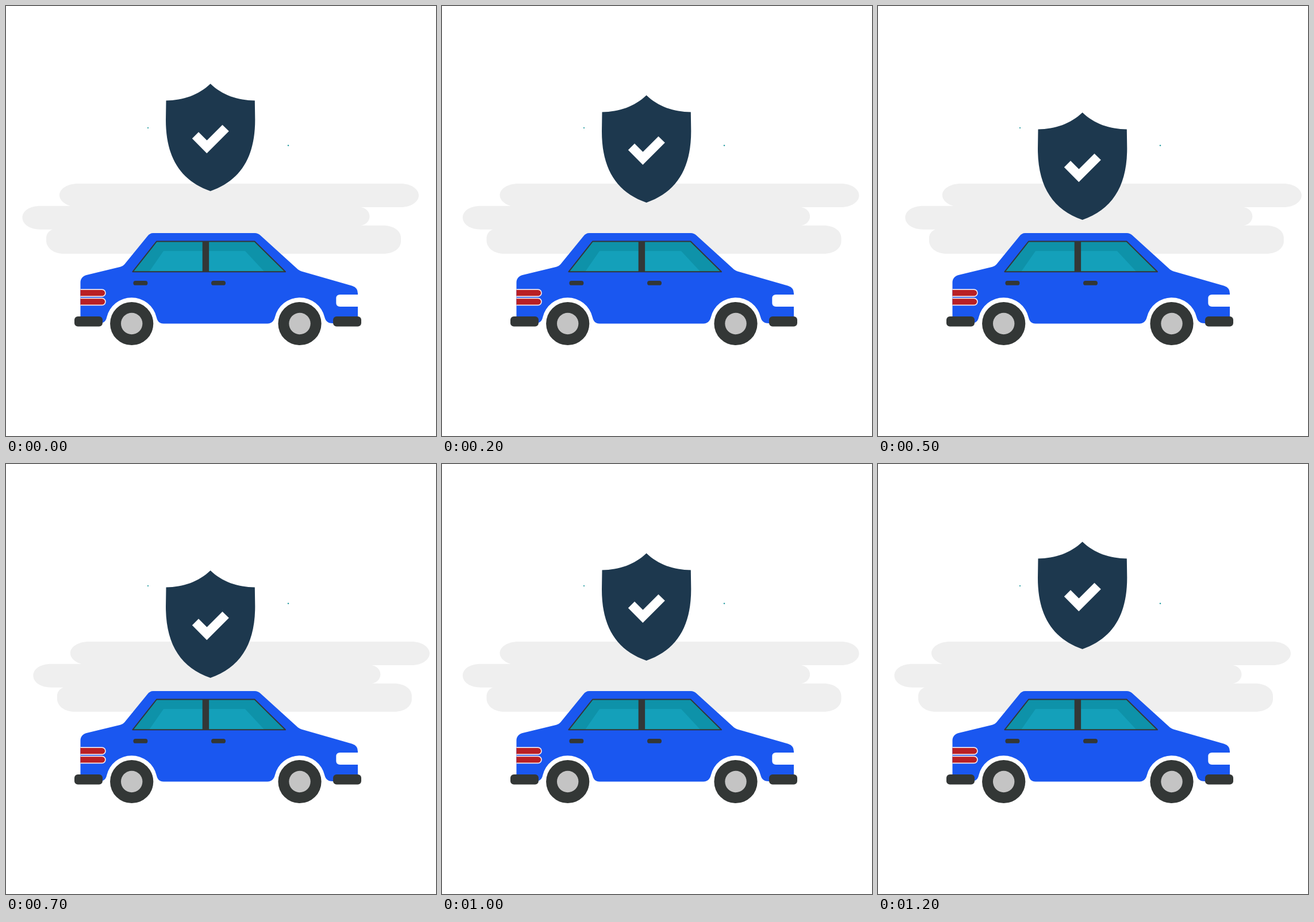
These frames come from a looping animation (748 px wide and 748 px high, 1300 ms). An HTML page:

```html
<!DOCTYPE html>
<html lang="en">
<head>
<meta charset="utf-8">
<title>Car protection</title>
<style>
  html, body { margin: 0; width: 100%; height: 100%; overflow: hidden; background: #fff; }
  svg { display: block; width: 100%; height: 100%; }
  .dark { fill: #333736; }
  .hub { fill: #c4c4c4; }
  .lamp { fill: #b91f24; stroke: #f3e6ea; stroke-width: 1.7; }
</style>
</head>
<body>
<svg viewBox="0 0 748 748">
  <defs>
    <g id="wheel">
      <circle class="dark" r="37.6"/>
      <circle class="hub" r="18.7"/>
    </g>
    <rect id="bumper" class="dark" y="540" width="49" height="17.6" rx="6"/>
    <rect id="handle" class="dark" y="478" width="25" height="7.8" rx="3.9"/>
    <path id="lamp" class="lamp" d="M129.5 0H167A6 6 0 0 1 167 12H129.5"/>
  </defs>

  <path id="cloud" fill="#efefef" d="M125 309H687C704 309 718 318 718 329.5S704 350 687 350H617
    C626 351 632.5 358 632.5 366S626 381 617 381.7H656C674 381.7 687 391 687 403V409
    C687 422 674 431 656 431H101C83 431 70 421 70 408V404C70 397 74 391 81 388.7H60
    C42 388.7 28.5 380 28.5 368S42 347.8 60 347.8H112C100 344 93 337 93 329C93 318 107 309 125 309Z"/>

  <g fill="#0e9297">
    <circle cx="247" cy="212" r="1.1"/>
    <circle cx="491" cy="242.6" r="1.2"/>
  </g>

  <g id="shield">
    <path fill="#1d384e" d="M355.6 135.3C335 155 308 164.3 278.5 164.5L278 198
      C278 264 304 304 355.6 322C407 304 433.3 264 433.3 198L432.8 164.5C403 164.3 376 155 355.6 135.3Z"/>
    <path fill="#fff" d="M323.8 230.5L335 219.3L349.5 233.7L376.5 206.8L387.8 217.8L349.3 256.3Z"/>
  </g>

  <path fill="#1a57f0" d="M129.5 552V481C129.5 474 134 469.5 140 468L199 453.7Q203.500 452.500 206 449.500
    L246 400.500Q250 395 256 395H433Q438 395 442 398.500L507 457.500Q510.500 460.500 514 461.500
    L602 486.800Q612 490 612 500V552H569C561 552 556 549 554.300 541.500A44.500 44.500 0 0 0 467.700 541.500
    C466 548.500 461 552.500 455 552.500H274C267 552.500 263.500 548.500 261.800 541.500
    A44.500 44.500 0 0 0 175.200 541.500C174 548 170 551 165 552Z"/>

  <path fill="#0e92a9" d="M262 409.5H432.5L486 462.3H220.300Z"/>
  <path fill="#14a0ba" d="M274 426.300H416L449.500 462.300H249Z"/>
  <path fill="none" stroke="#333736" stroke-width="1.9" stroke-linejoin="round"
    d="M262 409.500H432.500L486 462.300H220.300Z"/>
  <rect class="dark" x="341.700" y="409" width="11.400" height="54"/>

  <use href="#handle" x="221.400"/>
  <use href="#handle" x="357"/>
  <use href="#lamp" y="493.200"/>
  <use href="#lamp" y="508.300"/>
  <path fill="#fff" d="M613 502H581Q574.300 502 574.300 508.500V516.500Q574.300 523 581 523H613Z"/>
  <use href="#bumper" x="119"/>
  <use href="#bumper" x="569"/>
  <use href="#wheel" x="218.700" y="552.500"/>
  <use href="#wheel" x="511" y="552.500"/>
</svg>
<script>
  const LOOP = 1300, STEP = 100, PEAK = 6;
  const shield = document.getElementById('shield');
  const cloud = document.getElementById('cloud');
  const start = performance.now();

  function draw(now) {
    const time = Math.max(0, now - start) % LOOP;
    const tick = Math.floor(time / STEP);
    // Down and right for six steps, then back again
    const k = PEAK - Math.abs(PEAK - tick);
    shield.setAttribute('transform', `translate(0 ${k * 10})`);
    cloud.setAttribute('transform', `translate(${k * 3.77} 0)`);
    requestAnimationFrame(draw);
  }
  draw(start);
</script>
</body>
</html>
```
